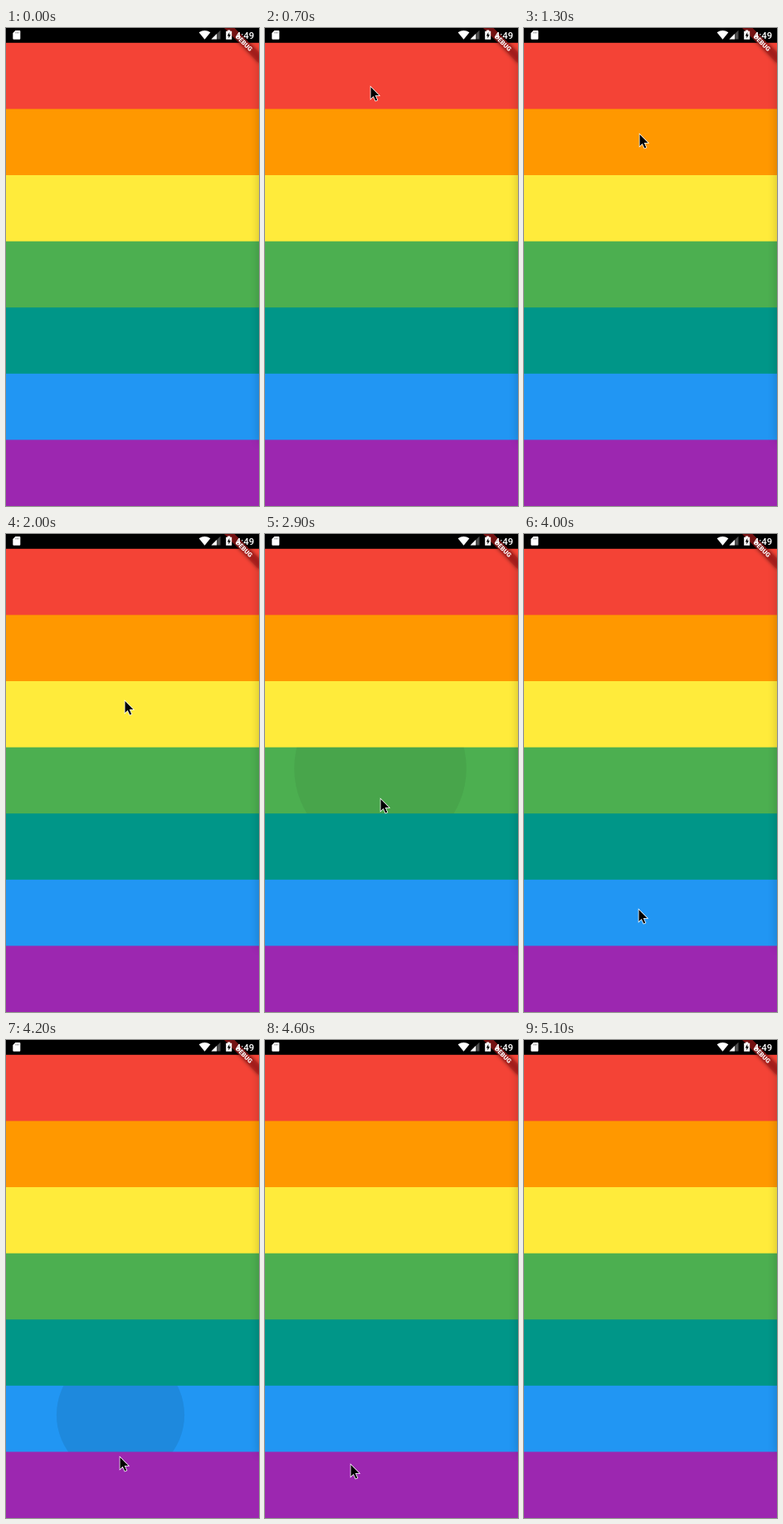
These frames come from a looping animation (305 by 575 pixels, 6.3 s). An HTML page:

```html
<!DOCTYPE html>
<html lang="en">
<head>
<meta charset="utf-8">
<title>Tap ripples</title>
<style>
html, body { margin: 0; width: 100%; height: 100%; overflow: hidden; background: #000; }
svg { display: block; width: 305px; height: 575px; }
text { font-family: Roboto, sans-serif; fill: #fff; }
</style>
</head>
<body>
<svg viewBox="0 0 305 575">
  <defs>
    <filter id="glow" x="-50%" y="-100%" width="200%" height="300%"><feGaussianBlur stdDeviation="2.2"/></filter>
    <filter id="shade" x="-100%" y="-10%" width="300%" height="120%"><feGaussianBlur stdDeviation="6"/></filter>
  </defs>

  <rect width="305" height="575"/>
  <g id="bands"></g>
  <rect x="305" y="32" width="40" height="466" opacity=".2" filter="url(#shade)"/>

  <g transform="translate(305 0) rotate(45)">
    <rect x="-29.7" y="20.8" width="59.4" height="8.9" opacity=".5" filter="url(#glow)"/>
    <rect x="-29.7" y="20.8" width="59.4" height="8.9" fill="#b71c1c" fill-opacity=".63"/>
    <text y="28" font-size="7.6" font-weight="900" text-anchor="middle">DEBUG</text>
  </g>

  <g fill="#fff">
    <path d="M11.300 3h5q1 0 1 1v8.800q0 1-1 1h-7q-1 0-1-1V6z"/>
    <path d="M11.800 4.500v2M13.500 4.500v2M15.200 4.500v2" stroke="#777" stroke-width=".7"/>
    <path d="M232.600 5.300q6.900-4.800 13.800 0l-6.900 8.400z"/>
    <path d="M247.500 13.500l11-10.800v10.800z" fill-opacity=".3"/>
    <path d="M247.500 13.500l6.500-6.400v6.400z"/>
    <path d="M267.200 2.500h3v1.200h2v10h-7v-10h2z"/>
    <path d="M269.300 5l-2.500 4.500h1.600v3l2.500-4.500h-1.600z" fill="#000"/>
    <text x="276.800" y="12.600" font-size="11.400" font-weight="500">4:49</text>
  </g>

  <path id="cursor" d="M.5 1v14l3.200-3 2.600 5.600 2-.9-2.500-5.600h4.600z"
        stroke="#fff" stroke-width="1.500" paint-order="stroke"/>
</svg>
<script>
const LOOP = 6300, TICK = 100;   // the picture updates ten times a second
const WIDTH = 305, HEIGHT = 575;
const SCALE = WIDTH / 411.4;     // stage pixels per device unit
const TOP = 24 * SCALE;          // below the status bar
const FADE = 200;                // ripple life in ms; it grows one device unit per ms
const NS = 'http://www.w3.org/2000/svg';

const colors = ['#f44336', '#ff9800', '#ffeb3b', '#4caf50', '#009688', '#2196f3', '#9c27b0'];
const bandHeight = (HEIGHT - TOP) / colors.length;

// Places where the pointer rests; it glides from one to the next
const stops = [
  { arrive: 0, leave: 350, x: -2, y: 74 },
  { arrive: 780, leave: 850, x: 140, y: 70 },
  { arrive: 1250, leave: 1390, x: 139, y: 127 },
  { arrive: 1950, leave: 1990, x: 143, y: 200 },
  { arrive: 2400, leave: 2690, x: 139, y: 282 },
  { arrive: 3170, leave: 3350, x: 138, y: 370 },
  { arrive: 3680, leave: 4026, x: 138, y: 451 },
  { arrive: 4320, leave: 4400, x: 136, y: 529 },
  { arrive: 5000, leave: 5100, x: 7, y: 457 }
];
const ENTER = 400, EXIT = 5100;

// Each band but the last is tapped just as the pointer moves on
const taps = stops.slice(1, colors.length).map(({ leave, x, y }) => ({ start: leave + 70, x, y }));

function add(parent, tag, attrs) {
  const node = document.createElementNS(NS, tag);
  for (const key in attrs) node.setAttribute(key, attrs[key]);
  return parent.appendChild(node);
}

const bands = document.getElementById('bands');
const cursor = document.getElementById('cursor');

colors.forEach((fill, i) => {
  const y = TOP + i * bandHeight;
  add(bands, 'rect', { y, width: WIDTH, height: HEIGHT - y, fill });
});

const ripples = taps.map(({ x, y }, i) => {
  const clip = add(bands, 'clipPath', { id: 'clip' + i });
  add(clip, 'rect', { y: TOP + i * bandHeight, width: WIDTH, height: bandHeight });
  const group = add(bands, 'g', { 'clip-path': `url(#clip${i})` });
  return add(group, 'circle', { cx: x, cy: y, r: 0 });
});

const smooth = u => u * u * (3 - 2 * u);

function pointerAt(time) {
  const next = stops.findIndex(stop => time < stop.leave);
  const to = stops[next];
  if (time >= to.arrive) return to;
  const from = stops[next - 1];
  const k = smooth((time - from.leave) / (to.arrive - from.leave));
  return { x: from.x + (to.x - from.x) * k, y: from.y + (to.y - from.y) * k };
}

function draw(time) {
  taps.forEach(({ start }, i) => {
    const age = time - start;
    const active = age > 0 && age < FADE;
    ripples[i].setAttribute('r', active ? age * SCALE : 0);
    ripples[i].setAttribute('fill-opacity', active ? 0.19 * (1 - age / FADE) : 0);
  });

  const visible = time >= ENTER && time < EXIT;
  cursor.setAttribute('visibility', visible ? 'visible' : 'hidden');
  if (visible) {
    const { x, y } = pointerAt(time);
    cursor.setAttribute('transform', `translate(${Math.round(x)} ${Math.round(y)})`);
  }
}

const origin = performance.now();
function frame() {
  const time = (performance.now() - origin) % LOOP;
  draw(Math.floor(time / TICK) * TICK);
  requestAnimationFrame(frame);
}
frame();
</script>
</body>
</html>
```
